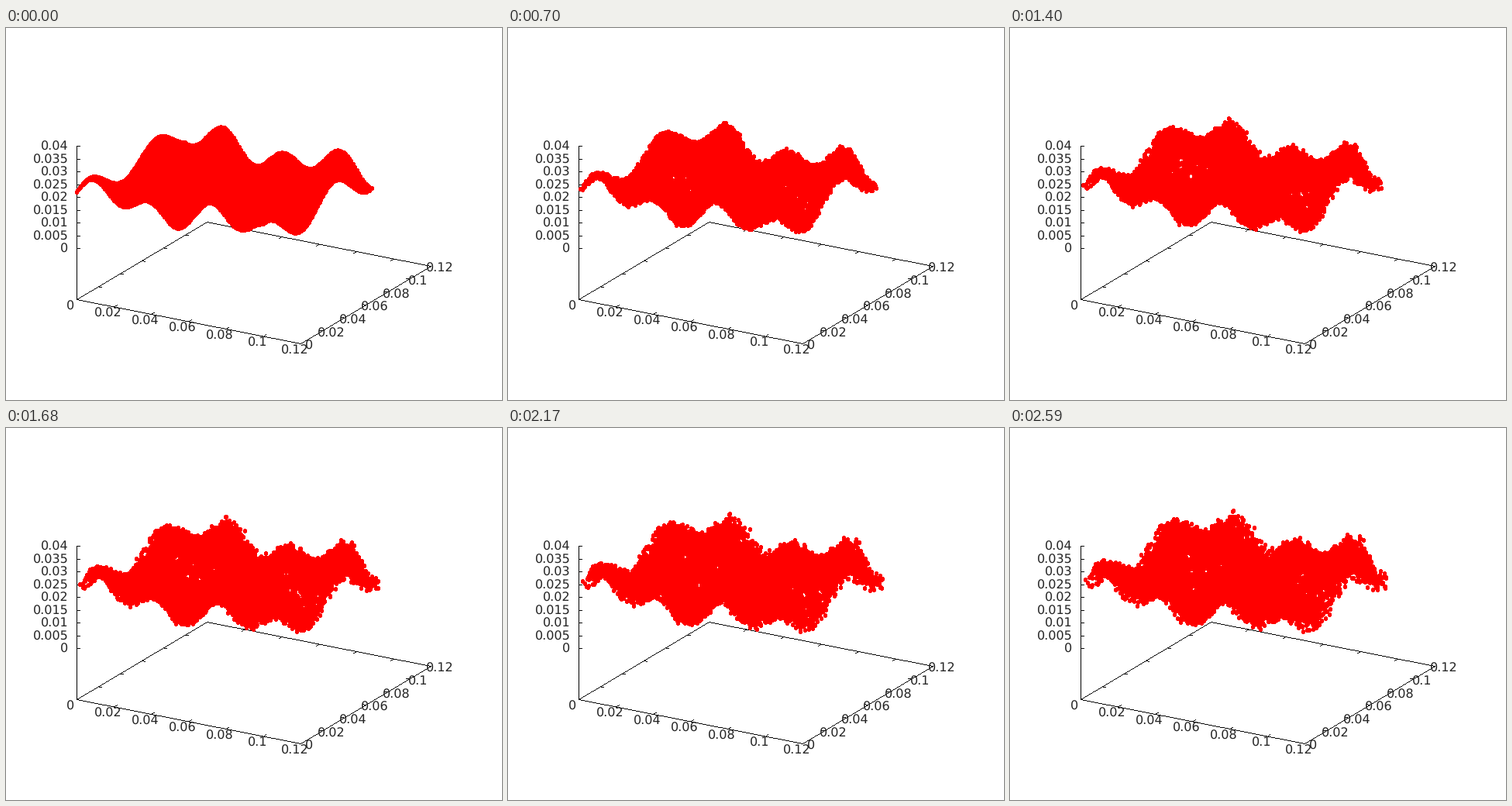
Animation of 640x480 px, one loop 2660 ms. Source, as a matplotlib script:

```python
import numpy as np
import matplotlib.pyplot as plt
from matplotlib.animation import FuncAnimation
from matplotlib.path import Path

plt.rcParams["text.hinting"] = "no_hinting"

W, H, DPI = 640, 480, 100
PX = 72 / DPI                       # points per pixel
FRAMES, INTERVAL = 38, 70
SPAN = 0.12                         # length of the x and y axes
ORIGIN = np.array([91, 350])
X_AXIS = np.array([289, 57])
Y_AXIS = np.array([168, -100])
Z_ZERO, Z_SCALE = 284, 3300
DRIFT = 0.006                       # largest displacement in one loop


def project(x, y, z):
    u, v = x / SPAN, y / SPAN
    px = ORIGIN[0] + X_AXIS[0] * u + Y_AXIS[0] * v
    py = Z_ZERO + X_AXIS[1] * u + Y_AXIS[1] * v - Z_SCALE * z
    return px, py


def surface(x, y):
    return (0.02 + 0.003 * np.sin(100 * x)
            + 0.004 * np.sin(200 * x + 100 * y)
            + 0.002 * np.cos(100 * y))


def stepped_path(spans, top):
    """Outline of pixel rows given as (left, right) edges, from the top down."""
    right, left = [], []
    for row, (a, b) in enumerate(spans):
        y = top - row
        right += [(b, y), (b, y - 1)]
        left += [(a, y), (a, y - 1)]
    verts = right + left[::-1]
    return Path(verts + verts[:1], closed=True)


PIXEL = stepped_path([(0, 1)], 0)
DOT = stepped_path([(-1, 2)] + [(-2, 3)] * 4 + [(-1, 2)], 2)

fig = plt.figure(figsize=(W / DPI, H / DPI), dpi=DPI, facecolor="white")
ax = fig.add_axes([0, 0, 1, 1])
ax.set_xlim(-0.5, W - 0.5)
ax.set_ylim(H - 0.5, -0.5)
ax.axis("off")


def snap(values):
    """Whole pixels, kept clear of the rounding edge."""
    return np.floor(np.asarray(values) + 0.5) - 0.3


def stamps(path, color, zorder):
    """Empty line whose points are drawn as path, one unit to a pixel."""
    size = 2 * np.abs(path.vertices).max() * PX   # markers scale by this
    line, = ax.plot([], [], linestyle="none", marker=path, markersize=size,
                    markerfacecolor=color, markeredgecolor="none",
                    markeredgewidth=0, antialiased=False, zorder=zorder)
    return line


def segment(p, q):
    n = int(np.ceil(max(abs(q[0] - p[0]), abs(q[1] - p[1])))) + 1
    line = stamps(PIXEL, "black", 1)
    line.set_data(snap(np.linspace(p[0], q[0], n)),
                  snap(np.linspace(p[1], q[1], n)))


def tick(p, direction):
    step = 4 * np.asarray(direction) / np.hypot(*direction)
    segment(p, np.asarray(p) + step)


def label(x, y, value, align="center"):
    ax.text(x, y + 5.5, f"{value:g}", ha=align, va="baseline",
            family="DejaVu Sans", size=16 * PX, color="0.15", zorder=3)


def draw_axes():
    right = ORIGIN + X_AXIS
    back = ORIGIN + Y_AXIS
    far = right + Y_AXIS
    for p, q in [(ORIGIN, right), (right, far), (far, back), (back, ORIGIN)]:
        segment(p, q)
    segment(ORIGIN, (ORIGIN[0], 152))

    for k in range(7):
        on_x, on_y = X_AXIS * k / 6, Y_AXIS * k / 6
        tick(ORIGIN + on_x, Y_AXIS)
        tick(back + on_x, -Y_AXIS)
        tick(ORIGIN + on_y, X_AXIS)
        tick(right + on_y, -X_AXIS)
        label(*(ORIGIN + on_x + (-8, 7.5)), 0.02 * k)
        label(*(right + on_y + (11, 2)), 0.02 * k)

    for k in range(9):
        y = Z_ZERO - 16.5 * k
        tick((ORIGIN[0], y), (1, 0))
        label(ORIGIN[0] - 11, y, 0.005 * k, "right")


draw_axes()

# Each particle starts on the wavy sheet and keeps its own steady velocity.
side = np.linspace(0, 0.1, 101)
gx, gy = (g.ravel() for g in np.meshgrid(side, side))
start = np.array([gx, gy, surface(gx, gy)])
rng = np.random.default_rng(12345)
velocity = rng.uniform(0, DRIFT, (gx.size, 3)).T / (FRAMES - 1)
dots = stamps(DOT, "red", 2)


def update(frame):
    px, py = project(*(start + velocity * frame))
    dots.set_data(snap(px), snap(py))
    return dots,


anim = FuncAnimation(fig, update, frames=FRAMES, interval=INTERVAL,
                     repeat=True, blit=False)
plt.show()
```
